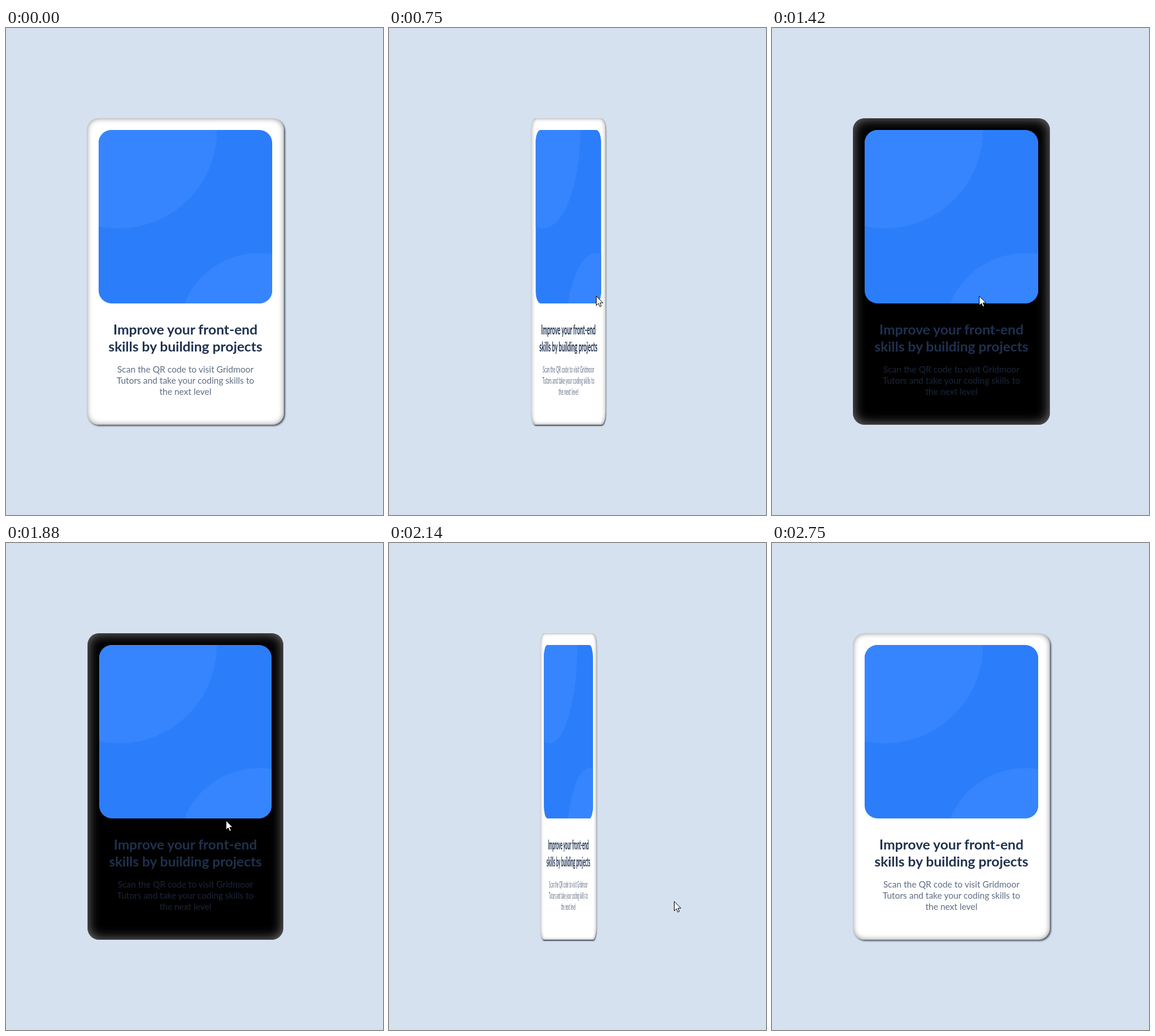
An HTML page that plays this animation: 643 px wide and 831 px high, repeating every 3140 ms.

```html
<!DOCTYPE html>
<html lang="en">
<head>
<meta charset="utf-8">
<title>Flip card</title>
<style>
  html, body { margin: 0; width: 100%; height: 100%; overflow: hidden; background: #d5e1ef; }
  #card {
    position: absolute; left: 138px; top: 154px; width: 336px; height: 523px;
    border-radius: 20px; background: #fff;
    box-shadow: 2px 2px 3px #4c5561, inset 0 0 10px #8c8c8c;
    --body: #5f6d83;
  }
  #card.back {
    background: #000; --body: #1b2638;
    box-shadow: inset 0 0 20px #808080;
  }
  svg { position: absolute; left: 0; top: 0; display: block; }
  text { font-family: Lato, "Open Sans", sans-serif; text-anchor: middle; }
  .head { font-size: 23.7px; font-weight: 700; fill: #1f314f; }
  .body { font-size: 15px; font-weight: 400; fill: var(--body); }
</style>
</head>
<body>
<div id="card">
  <svg width="336" height="523" viewBox="138 154 336 523">
    <clipPath id="pic"><rect x="158" y="174" width="296" height="296" rx="22"/></clipPath>
    <g clip-path="url(#pic)">
      <rect x="158" y="174" width="296" height="296" fill="#2c7dfa"/>
      <g fill="#3685ff">
        <circle cx="192" cy="174" r="168"/>
        <circle cx="432" cy="522" r="138"/>
      </g>
    </g>
    <g class="head">
      <text x="306" y="523">Improve your front-end</text>
      <text x="306" y="552">skills by building projects</text>
    </g>
    <g class="body">
      <text x="306" y="588">Scan the QR code to visit Gridmoor</text>
      <text x="306" y="607">Tutors and take your coding skills to</text>
      <text x="306" y="626">the next level</text>
    </g>
  </svg>
</div>
<svg width="643" height="831" viewBox="0 0 643 831">
  <path id="cursor" d="M.5 .5V16.5L4.2 13L6.7 18.6L9.2 17.5L6.8 12H11.8Z" fill="#fff" stroke="#000" stroke-linejoin="round"/>
</svg>
<script>
const LOOP = 3140, FLIP = 900;
const ENTER = 130, LEAVE = 1880;          // pointer starts to move
const TURN_IN = 528, TURN_OUT = 1832;     // card starts to turn
const card = document.getElementById('card');
const cursor = document.getElementById('cursor');

// Pointer route: time, x, y
const route = [
  [ENTER, 598, 816], [480, 480, 627], [670, 353, 457],
  [1820, 353, 457], [2010, 422, 508], [2335, 582, 766], [2405, 598, 806]
];

const clamp = v => Math.min(1, Math.max(0, v));
const mix = (a, b, k) => a + (b - a) * k;

// The picture is held for about a fifteenth of a second at a time.
function hold(time) {
  if (time < ENTER) return 0;
  const [from, step] = time < LEAVE ? [ENTER, 67.8] : [LEAVE, 65];
  return from + Math.floor((time - from) / step) * step;
}

// CSS "ease", cubic-bezier(.25, .1, .25, 1)
function ease(x) {
  let lo = 0, hi = 1;
  for (let i = 0; i < 24; i++) {
    const s = (lo + hi) / 2;
    if (0.75 * s * (1 - s) + s ** 3 < x) lo = s; else hi = s;
  }
  const s = (lo + hi) / 2, r = 1 - s;
  return 0.3 * r * r * s + 3 * r * s * s + s ** 3;
}

function pointer(t) {
  const i = route.findIndex(p => p[0] >= t);
  if (t < ENTER || i < 0) return null;
  const b = route[i], a = route[Math.max(0, i - 1)];
  const k = a === b ? 0 : (t - a[0]) / (b[0] - a[0]);
  return [mix(a[1], b[1], k), mix(a[2], b[2], k)];
}

function draw(time) {
  const t = hold(time);
  const start = t < TURN_OUT ? TURN_IN : TURN_OUT;
  const turn = ease(clamp((t - start) / FLIP));
  const back = (turn >= 0.5) === (start === TURN_IN);
  card.className = back ? 'back' : '';
  card.style.transform = `scaleX(${Math.abs(Math.cos(turn * Math.PI))})`;

  const p = pointer(t);
  cursor.style.display = p ? '' : 'none';
  if (p) cursor.setAttribute('transform', `translate(${p[0]} ${p[1]})`);
}

const begin = performance.now();
function frame() {
  draw((performance.now() - begin) % LOOP);
  requestAnimationFrame(frame);
}
frame();
</script>
</body>
</html>
```
